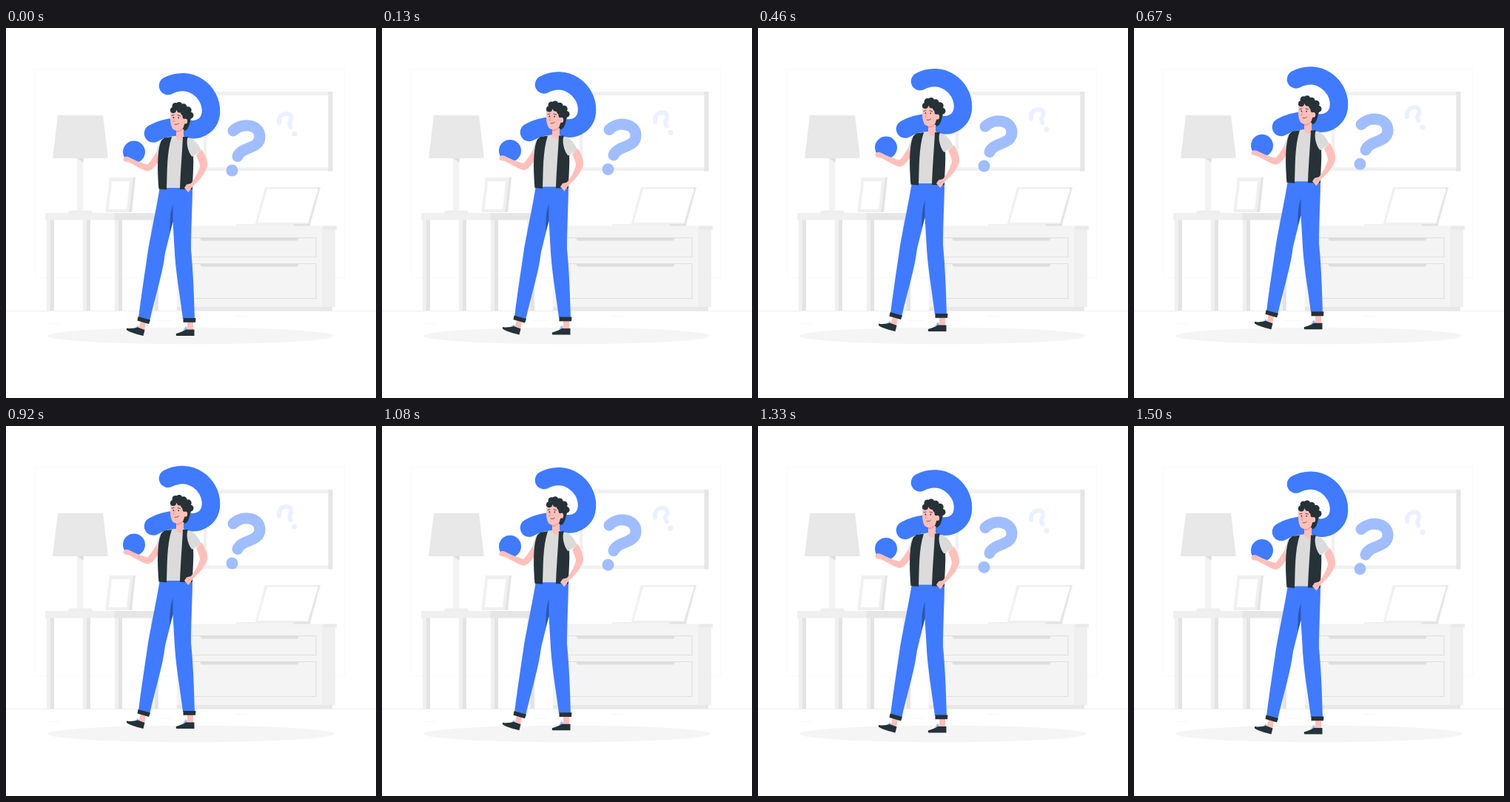
Write an HTML page with a canvas that moves like this. It is 500 by 500 pixels and loops after 1540 ms.

```html
<!DOCTYPE html>
<html lang="en">
<head>
<meta charset="utf-8">
<title>Floating question</title>
<style>
html, body { margin: 0; width: 100%; height: 100%; overflow: hidden; background: #fff; }
canvas { display: block; width: 100vmin; height: 100vmin; }
</style>
</head>
<body>
<canvas id="stage"></canvas>
<script>
const SIZE = 500, LOOP = 1540, FRAMES = 37, FPS = 24, STEP = 0.54;
const BLUE = '#407bff', DARK = '#263238', SKIN = '#ffc0bb', SHIRT = '#dbdbdb';

const canvas = document.getElementById('stage');
const ctx = canvas.getContext('2d');
const scale = window.devicePixelRatio || 1;
canvas.width = canvas.height = SIZE * scale;

function fill(path, color) {
  ctx.fillStyle = color;
  ctx.fill(new Path2D(path));
}

function line(path, color, width = 1) {
  ctx.strokeStyle = color;
  ctx.lineWidth = width;
  ctx.lineCap = ctx.lineJoin = 'round';
  ctx.stroke(new Path2D(path));
}

function box(x, y, right, bottom, color) {
  ctx.fillStyle = color;
  ctx.fillRect(x, y, right - x, bottom - y);
}

function oval(x, y, rx, ry, color) {
  ctx.fillStyle = color;
  ctx.beginPath();
  ctx.ellipse(x, y, rx, ry, 0, 0, Math.PI * 2);
  ctx.fill();
}

const dot = (x, y, r, color) => oval(x, y, r, r, color);

function drawWall() {
  ctx.strokeStyle = '#fafafa';
  ctx.lineWidth = 1;
  ctx.strokeRect(39.5, 55.5, 418, 282);
  box(0, 382, 500, 383, '#efefef');
  box(54, 399, 72, 400, '#f8f8f8');
  box(204, 395, 224, 396, '#f8f8f8');
  box(310, 389, 328, 390, '#f5f5f5');
  box(267, 86, 436, 193, '#f0f0f0');
  box(435, 86, 441.5, 193.5, '#e6e6e6');
  box(271, 91, 435.5, 188.5, '#fff');
}

function drawTable() {
  for (const x of [55, 104, 147, 196]) {
    box(x, 259, x + 5, 382, '#f0f0f0');
    box(x + 5, 259, x + 10, 382, '#e3e3e3');
  }
  box(53, 250, 147, 259.5, '#f0f0f0');
  box(146.5, 250, 212, 259.5, '#e6e6e6');

  box(96, 176, 104.5, 248, '#f3f3f3');
  fill('M96 176H105L104.5 182Z', '#dedede');
  fill('M70 118H131L138 176H63Z', '#e8e8e8');
  fill('M84 250.5C84 247 86 246.5 89 246.5H112C116 246.5 117 248 117 250.5Z', '#eee');

  fill('M144 202H175L170 249H137Z', '#e4e4e4');
  fill('M140 202H172L166 249H134Z', '#f0f0f0');
  fill('M143 207H167L163 245H139Z', '#fff');
}

function drawCabinet() {
  box(231, 272, 428, 377, '#f4f4f4');
  box(427, 272, 445, 377, '#efefef');
  box(231, 377, 441, 382, '#e8e8e8');
  box(231, 267.5, 428, 273, '#f3f3f3');
  box(428, 267.5, 447, 272, '#e9e9e9');
  ctx.strokeStyle = '#dfdfdf';
  ctx.lineWidth = 1.2;
  ctx.strokeRect(243, 283.5, 176, 26);
  ctx.strokeRect(243, 318.5, 176, 47);
  for (const y of [283.5, 318.5]) {
    fill(`M262 ${y}H396L394 ${y + 4}H264Z`, '#dedede');
  }
  fill('M351 215H425L411 266H337Z', '#e6e6e6');
  fill('M350 215H421L408 265H337Z', '#f0f0f0');
  fill('M353 217.5H422L408 263H340Z', '#fff');
  box(311, 265, 390, 267.5, '#f0f0f0');
  box(389, 265, 411, 267.5, '#e0e0e0');
}

function drawQuestions() {
  line('M219 78C248 63 277 85 277 112C277 130 262 140 246 136.5C228 132 214 134 199 142.5', BLUE, 24.5);
  dot(173, 167.5, 15, BLUE);
  line('M307 139C319 127 343 130 343 147C343 164 318 160 313 173.5', '#a0bdff', 15);
  dot(305.5, 192.5, 8, '#a0bdff');
  line('M369 128.5C367 114 385 112 385.5 121.5C386 127 380 126 384.5 134', '#ebf1ff', 6);
  dot(390, 143, 3.6, '#ebf1ff');
}

function drawLegs() {
  fill('M182 396L189 398L187 410L179 407Z', SKIN);
  fill('M245 397H253V409H245Z', SKIN);
  fill('M174 406L178 402L181 406Z', '#a0bdff');
  fill('M239 409L243 403L246 408Z', '#a0bdff');
  fill('M163 405.5C170 407 174 405 178 404.5L187.5 408L185.5 416C178 414 169 412 163 408Z', DARK);
  fill('M230 413C236 411 239 410 243 407.5H254.5V416H231C229.5 416 229.5 414 230 413Z', DARK);
  fill('M208 214H252C252 240 250 270 250 300C253 330 254 360 255 394L239 393C235 360 229 330 227.5 296L225.5 262L215 304C212 332 200 368 194 397L179 392C183 360 188 328 192 300C197 272 204 240 208 214Z', BLUE);
  fill('M225.5 239C221 252 221.5 263 221 277L225.5 262Z', '#2c56b3');
  fill('M178.5 390L195 394.5L193 400L177.5 395.5Z', DARK);
  fill('M239.5 392H256.5L256 397.8H239.5Z', DARK);
}

function drawTorso() {
  fill('M206 163C200 173 196 180 191 184.5C182 182 174 179 166 174.5C162 172.5 158 175 158.5 178C159 181 163 181 166 181.5C176 186 184 192.5 192 193.5C199 192 204 183 208 178Z', SKIN);
  fill('M213 149C207 153 204 162 203.5 171L208 175Z', SHIRT);
  fill('M222 147L231 145.5H240L244 150L238 216H214L215 165Z', SHIRT);
  fill('M230 137H240V149C236 153.5 232 152 230 148Z', SKIN);
  fill('M214 148.5L224 147C217 168 218 195 217 218.5L206.5 217.5C204.5 192 204 164 210 152Z', DARK);
  fill('M239 147H246L253 170C254 186 252 202 252 218H235C236 190 238 169 239 147Z', DARK);
  fill('M257 172L264.5 164C270 173 273 181 272 187C268 199 260 207 253 213L246.5 222L241 216L244 211.5L250 210C257 201 261 192 262 186C261 181 259 176 257 172Z', SKIN);
  line('M245 217L249 213.5M243.5 214.5L246 212', '#eb8f89', 0.5);
  fill('M245.5 148C254 149 260 157 264 166L251.5 174C246 168 243 155 245.5 148Z', SHIRT);
}

function drawHead() {
  fill('M238 111L251 119C248 127 248 136 242 139L238 135Z', DARK);
  fill('M223.5 113C221 121 222 130 224.5 135C227 140 236 140 239.5 135L242.5 126L240 113L232 109Z', SKIN);
  fill('M230 138.5C234 139 237 137 239 135C238 139 235 141 230 141Z', '#f5a19b');
  fill('M223 119L222.5 113L230 111L237 112L239 122L241 123L246 123L249 117L243 108L226 106L222 111Z', DARK);
  fill('M223 117C225 114 229 113 235 115L238 124L235 128H224Z', SKIN);
  for (const [x, y, r] of [[226, 111, 4], [229, 105.5, 4.5], [234, 104, 4], [240, 107, 4.7],
    [246, 111, 4.7], [249, 118, 4.5], [245, 124, 3.8], [235, 110, 4.5], [240, 114, 4]]) {
    dot(x, y, r, DARK);
  }
  oval(242.5, 126, 2.7, 3.6, SKIN);
  oval(226.3, 121, 0.8, 1.1, DARK);
  oval(233.2, 121.3, 0.8, 1.1, DARK);
  line('M224 118.3L227 117.6M232 117.7L235.5 118.7', DARK, 0.8);
  line('M228 121.5C227 124 226 125.5 226 126.3L228 126.6', '#e8867e', 0.8);
  line('M228 130.2C230.5 130.7 232.5 130 233.5 128.8', DARK, 0.7);
}

function draw(time) {
  const frame = Math.min(FRAMES - 1, Math.floor((time % LOOP + 5) * FPS / 1000));
  const phase = (frame + 1) % FRAMES;
  const lift = STEP * (Math.min(phase, FRAMES - phase) - 1);

  ctx.setTransform(scale, 0, 0, scale, 0, 0);
  box(0, 0, SIZE, SIZE, '#fff');
  drawWall();
  drawTable();
  drawCabinet();
  oval(249.5, 416, 194, 11.3, '#f5f5f5');

  ctx.translate(0, -lift);
  drawQuestions();
  drawLegs();
  drawTorso();
  drawHead();
}

const start = performance.now();
function tick() {
  draw(performance.now() - start);
  requestAnimationFrame(tick);
}
draw(0);
requestAnimationFrame(tick);
</script>
</body>
</html>
```
